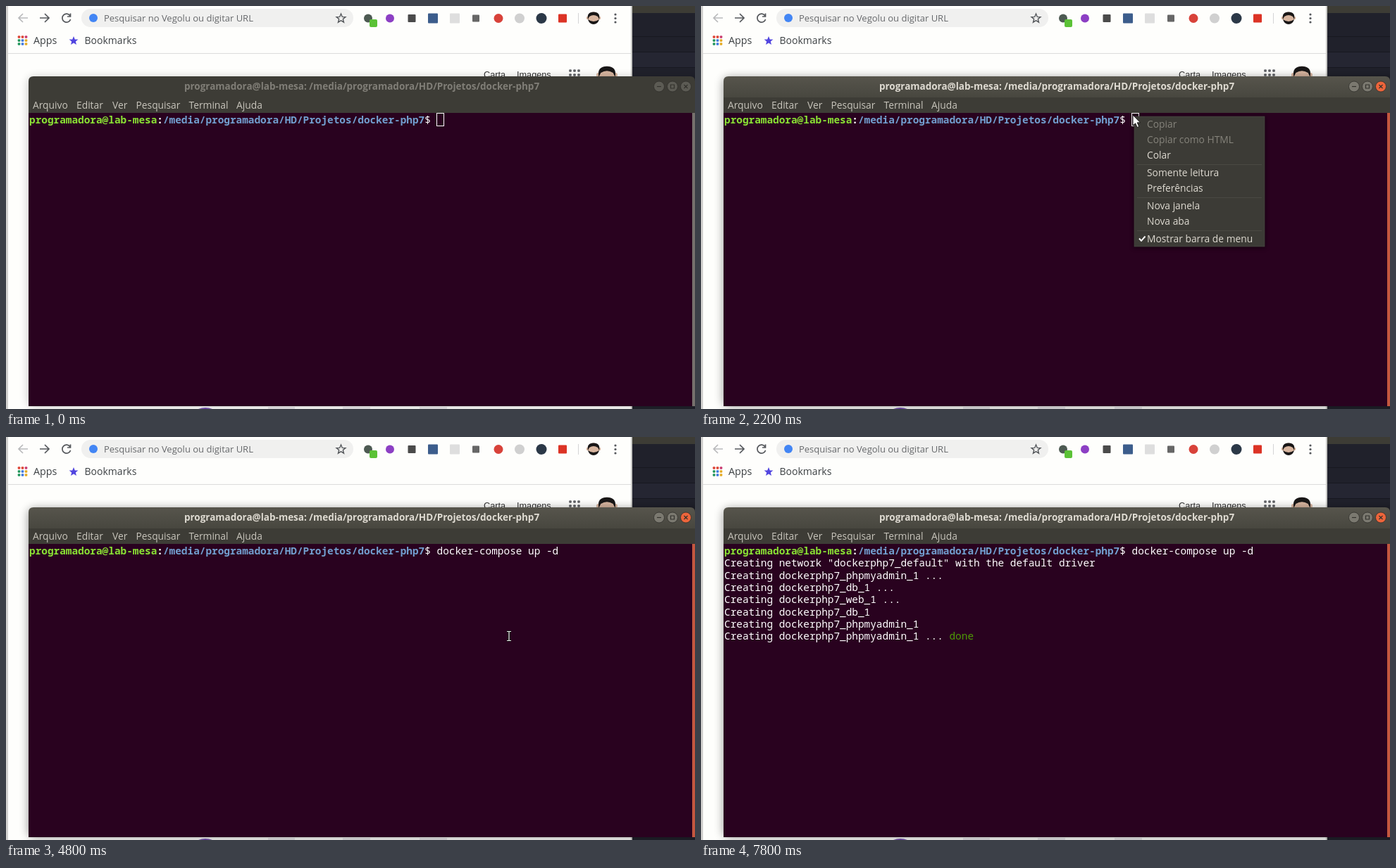
Recreate the animation shown at these times as an HTML page. Size 978 by 573 pixels, loop 8000 ms.

```html
<!DOCTYPE html>
<html lang="pt">
<head>
<meta charset="utf-8">
<title>Terminal</title>
<style>
  html, body { margin: 0; width: 100%; height: 100%; overflow: hidden; background: #fefefc; }
  svg { display: block; width: 100vw; height: 100vh; }
  text { white-space: pre; font: 13.8px "Open Sans", "Noto Sans", sans-serif; }
  .page { font: 12.7px "Liberation Sans", Arial, sans-serif; fill: #333; }
  #term text { font: 14.4px "Noto Sans Mono", "DejaVu Sans Mono", monospace; fill: #fff; }
  #term .bold { font-weight: 700; }
  #title { font-size: 13.5px; font-weight: 700; text-anchor: middle; }
  #shadow { filter: blur(7px); }
  #context-shadow { filter: blur(3px); }
</style>
</head>
<body>
<svg viewBox="0 0 978 573" preserveAspectRatio="none">
  <defs>
    <linearGradient id="active-bar" x2="0" y2="1">
      <stop stop-color="#57554c"/><stop offset="1" stop-color="#3d3c36"/>
    </linearGradient>
    <path id="star" d="M0-6.5 1.8-2.1 6.4-1.9 2.8 1.1 4 5.6 0 3.1-4 5.6-2.8 1.1-6.4-1.9-1.8-2.1Z"/>
  </defs>

  <!-- Browser -->
  <rect width="978" height="573" fill="#fefefc"/>
  <rect width="3" height="573" fill="#d2d1cf"/>
  <path d="M3 67.5H887" stroke="#dcdcdc"/>
  <g fill="none" stroke="#55585c" stroke-width="1.7">
    <path d="M31 17H18M24 11l-6 6 6 6" stroke="#b9babc"/>
    <path d="M48 17H61M55 11l6 6-6 6"/>
    <path d="M91 14a6 6 0 1 0 .6 5M91.5 10.500v4.500h-4.500"/>
  </g>
  <rect x="107" y="4" width="386" height="26" rx="13" fill="#f0f0ef"/>
  <circle cx="124" cy="17" r="6" fill="#4285f4"/>
  <text x="139" y="22" style="font-size:13px" fill="#66686b">Pesquisar no Vegolu ou digitar URL</text>
  <use href="#star" x="475.500" y="17.500" fill="none" stroke="#55585c" stroke-width="1.4"/>
  <g id="extensions"></g>
  <rect x="516" y="19" width="11" height="11" rx="2" fill="#5bc236"/>
  <path d="M812.500 10V25" stroke="#d5d5d5"/>
  <g fill="#55585c"><circle cx="865" cy="12" r="1.600"/><circle cx="865" cy="17.500" r="1.600"/><circle cx="865" cy="23" r="1.600"/></g>
  <g id="apps"></g>
  <text x="39" y="54" style="font-size:14.3px" fill="#3c4043">Apps</text>
  <use href="#star" x="96" y="49.500" fill="#5145df"/>
  <text x="111.500" y="54" style="font-size:14px" fill="#3c4043">Bookmarks</text>
  <text class="page" x="678" y="102">Carta</text>
  <text class="page" x="725" y="102">Imagens</text>
  <g id="silhouettes"></g>

  <!-- Page bottom and editor behind -->
  <path d="M372 570h38v3h-38zM478 570h39v3h-39zM587 570h39v3h-39z" fill="#e8e7ea"/>
  <path d="M273 573q10-4 20 0z" fill="#7650b0"/>
  <rect x="887" width="2" height="573" fill="#c9c9c6"/>
  <rect x="889" width="89" height="573" fill="#20212b"/>
  <rect x="889" width="89" height="10" fill="#3d3c35"/>
  <path d="M889 43.500h89M889 65.500h89M889 87.500h89" stroke="#171820"/>
  <path d="M889 66h89v21h-89z" fill="#252632"/>

  <!-- Terminal window -->
  <rect id="shadow" x="32" y="102" width="960" height="467" rx="8"/>
  <path id="bar" d="M32 152V107q0-7 7-7H971q7 0 7 7V152Z"/>
  <path d="M32 130H978V152H32Z" fill="#3d3c36"/>
  <text id="title" x="505" y="119">programadora@lab-mesa: /media/programadora/HD/Projetos/docker-php7</text>
  <g id="buttons"></g>
  <g id="menubar" fill="#c8c5bc"></g>
  <rect x="32" y="152" width="942" height="417" fill="#29021f"/>
  <rect id="scrollbar" x="974" y="152" width="4" height="417"/>
  <g id="term"></g>
  <rect id="cursor"/>

  <g id="context">
    <rect id="context-shadow" x="614" y="157" width="187" height="187" opacity=".5"/>
    <rect x="615" y="157" width="185" height="185" fill="#3c3b36" stroke="#4b4a44" stroke-width=".6"/>
    <rect id="hover" x="615" width="185" height="22" fill="#f07746"/>
    <path d="M619 225.500H796M619 272.500H796M619 319.500H796" stroke="#4a4943"/>
    <path d="M622 330.500l3 3.300 5.500-6.300" fill="none" stroke="#fff" stroke-width="2"/>
    <g id="context-items"></g>
  </g>

  <path id="arrow" d="M0 0V15L3.600 11.800 6.200 17.500 8.700 16.400 6.200 10.800H10.500Z" fill="#fff" stroke="#111" stroke-width=".9"/>
  <g id="beam" fill="none">
    <path d="M-3-6.500H3M0-6.500V6.500M-3 6.500H3" stroke="#111" stroke-width="3"/>
    <path d="M-3-6.500H3M0-6.500V6.500M-3 6.500H3" stroke="#eee" stroke-width="1.200"/>
  </g>
</svg>
<script>
const $ = id => document.getElementById(id);
const CELL = 8.64, LINE = 17.33, LEFT = 33, LOOP = 8000;

const fill = (id, items, draw) => { $(id).innerHTML = items.map(draw).join(''); };
const show = (id, visible) => $(id).setAttribute('visibility', visible ? 'visible' : 'hidden');
const set = (id, attrs) => {
  for (const name in attrs) $(id).setAttribute(name, attrs[name]);
};
const dot = (x, y, r, color) => `<circle cx="${x}" cy="${y}" r="${r}" fill="${color}"/>`;
const box = (x, y, size, color) =>
  `<rect x="${x - size / 2}" y="${y - size / 2}" width="${size}" height="${size}" rx="1" fill="${color}"/>`;

// Static icon rows and menus
fill('extensions', [
  [dot, 514, 6, '#4d5a52'], [dot, 545, 6, '#8c3fc4'], [box, 576, 11, '#4a4a4a'],
  [box, 606, 14, '#3c5d8c'], [box, 637, 14, '#dedede'], [box, 667, 10, '#666'],
  [dot, 699, 6.5, '#d8423a'], [dot, 729, 7, '#d0d0d0'], [dot, 760, 7.5, '#2b3847'],
  [box, 790, 12, '#dc3325']
], ([shape, x, size, color]) => shape(x, 17.5, size, color));

const grid = [...Array(9).keys()];
const appColors = ['#dd4436', '#dd4436', '#c93a70', '#21965a', '#3f78df', '#e5ab23', '#21965a', '#3f78df', '#e5ab23'];
fill('apps', grid, i => box(18.5 + i % 3 * 5, 44 + (i / 3 | 0) * 5, 3.5, appColors[i])
  + box(801 + i % 3 * 6, 92 + (i / 3 | 0) * 6, 3.6, '#606266'));

fill('silhouettes', [[834, 17, 1], [853, 98, 1.45]], ([x, y, s]) =>
  `<g transform="translate(${x} ${y}) scale(${s})">${dot(-8, 0, 2.3, '#d7b59f')}${dot(8, 0, 2.3, '#d7b59f')}
   <ellipse rx="8" ry="8.500" fill="#d7b59f"/>
   <path d="M-8 2Q-10-8.500 0-8.500T8 2L6-2Q0-6-6-2Z" fill="#191717"/>
   <path d="M-8 2Q-6 9 0 9T8 2Q4 5 0 5T-8 2Z" fill="#191717"/></g>`);

fill('menubar', [['Arquivo', 38], ['Editar', 100], ['Ver', 151], ['Pesquisar', 184.5], ['Terminal', 259.5], ['Ajuda', 327]],
  ([label, x]) => `<text x="${x}" y="146">${label}</text>`);

fill('context-items', [
  ['Copiar', 173], ['Copiar como HTML', 195], ['Colar', 217], ['Somente leitura', 242],
  ['Preferências', 264], ['Nova janela', 289], ['Nova aba', 311], ['Mostrar barra de menu', 336]
], ([label, y], i) => `<text x="633" y="${y}" fill="${i < 2 ? '#85837b' : '#dedad1'}">${label}</text>`);

const glyphs = ['M-3 0H3', 'M-2.500-2.500H2.500V2.500H-2.500Z', 'M-2.500-2.500 2.500 2.500M2.500-2.500-2.500 2.500'];
const drawButtons = focused => fill('buttons', glyphs, (d, i) => {
  const color = !focused ? '#5c5b54' : i === 2 ? '#ed653b' : '#7b7970';
  return `<g transform="translate(${927 + i * 19} 114.500)">
    <circle r="7.500" fill="${color}" stroke="#302f2b" stroke-width=".8"/>
    <path d="${d}" fill="none" stroke="#33322d" stroke-width="1.200"/></g>`;
});

// Terminal text
const span = (text, color, cls = '') => `<tspan fill="${color}" class="${cls}">${text}</tspan>`;
const prompt = span('programadora@lab-mesa', '#8ae234', 'bold') + span(':', '#fff', 'bold')
  + span('/media/programadora/HD/Projetos/docker-php7', '#729fcf', 'bold') + '$ ';
const command = 'docker-compose up -d';
const PROMPT_COLS = 67;
const output = [
  'network "dockerphp7_default" with the default driver',
  'dockerphp7_phpmyadmin_1 ...', 'dockerphp7_db_1 ...', 'dockerphp7_web_1 ...',
  'dockerphp7_db_1', 'dockerphp7_phpmyadmin_1', 'dockerphp7_web_1'
].map(s => 'Creating ' + s);
const finished = 'Creating dockerphp7_phpmyadmin_1 ... ' + span('done', '#4e9a06');

// Each entry holds from its time on: [ms, shape, x, y]
const pointerPath = [
  [0],
  [1100, 'arrow', 496, 560], [1200, 'beam', 640, 330], [1300, 'arrow', 763, 92],
  [1500, 'beam', 738, 165], [1600, 'beam', 672, 235], [1700, 'beam', 619, 273],
  [2000, 'beam', 617, 205], [2100, 'beam', 616, 157], [2200, 'arrow', 613, 155],
  [2400, 'arrow', 620, 184], [2500, 'arrow', 632, 218], [2600, 'arrow', 641, 246],
  [2700, 'arrow', 644, 206], [3100, 'beam', 655, 222], [3200, 'beam', 682, 250],
  [3300, 'beam', 707, 278], [3500, 'beam', 711, 281], [3600, 'beam', 714, 283],
  [5000],
  [6400, 'beam', 714, 283], [6500, 'beam', 565, 326], [6600, 'beam', 330, 393],
  [6700, 'beam', 200, 414], [7500, 'beam', 167, 423],
  [7800]
];

function drawTerminal(t, pasted, count) {
  const lines = [prompt + (pasted ? command : ''), ...output.slice(0, count)];
  if (t >= 7700) lines[7] = finished;
  fill('term', lines, (line, i) => `<text x="${LEFT}" y="${167 + i * LINE}">${line}</text>`);
}

function drawCursor(t, pasted, count, menuOpen) {
  const hollow = t < 2100 || menuOpen;
  const blinkOn = (Math.floor(t / 600) % 2 === 1) === (t < 5000);
  const column = count ? 0 : PROMPT_COLS + (pasted ? command.length : 0);
  const row = count ? count + 1 : 0;
  const inset = hollow ? 0.5 : 0;
  show('cursor', t < 3000 || blinkOn);
  set('cursor', {
    x: Math.round(LEFT + column * CELL) - inset, y: Math.round(153 + row * LINE) - inset,
    width: 9 + 2 * inset, height: 17 + 2 * inset,
    fill: hollow ? 'none' : '#fff', stroke: hollow ? '#fff' : 'none'
  });
}

function drawPointer(shape, x, y) {
  for (const id of ['arrow', 'beam']) show(id, id === shape);
  if (shape) set(shape, { transform: `translate(${x} ${y})` });
}

function render(t) {
  const focused = t >= 2200, menuOpen = focused && t < 3000, pasted = t >= 3100;
  const count = t < 5000 ? 0 : t < 5100 ? 1 : t < 5200 ? 4 : 7;
  const [, shape, x, y] = pointerPath.findLast(step => step[0] <= t);

  set('shadow', { opacity: focused ? 0.42 : 0.24 });
  set('bar', { fill: focused ? 'url(#active-bar)' : '#3d3c36' });
  set('title', { fill: focused ? '#dfdbd2' : '#807e77' });
  set('scrollbar', { fill: focused ? '#c4573f' : '#76716d' });
  drawButtons(focused);
  drawTerminal(t, pasted, count);
  drawCursor(t, pasted, count, menuOpen);

  const hoverTop = y >= 201 && y < 223 ? 201 : y >= 226 && y < 248 ? 226 : 0;
  $('context').style.display = menuOpen ? '' : 'none';
  $('hover').style.display = hoverTop ? '' : 'none';
  set('hover', { y: hoverTop });
  drawPointer(shape, x, y);
}

let lastTick = -1;
function frame() {
  const tick = Math.floor(performance.now() % LOOP / 100);
  if (tick !== lastTick) render((lastTick = tick) * 100);
  requestAnimationFrame(frame);
}
frame();
</script>
</body>
</html>
```
